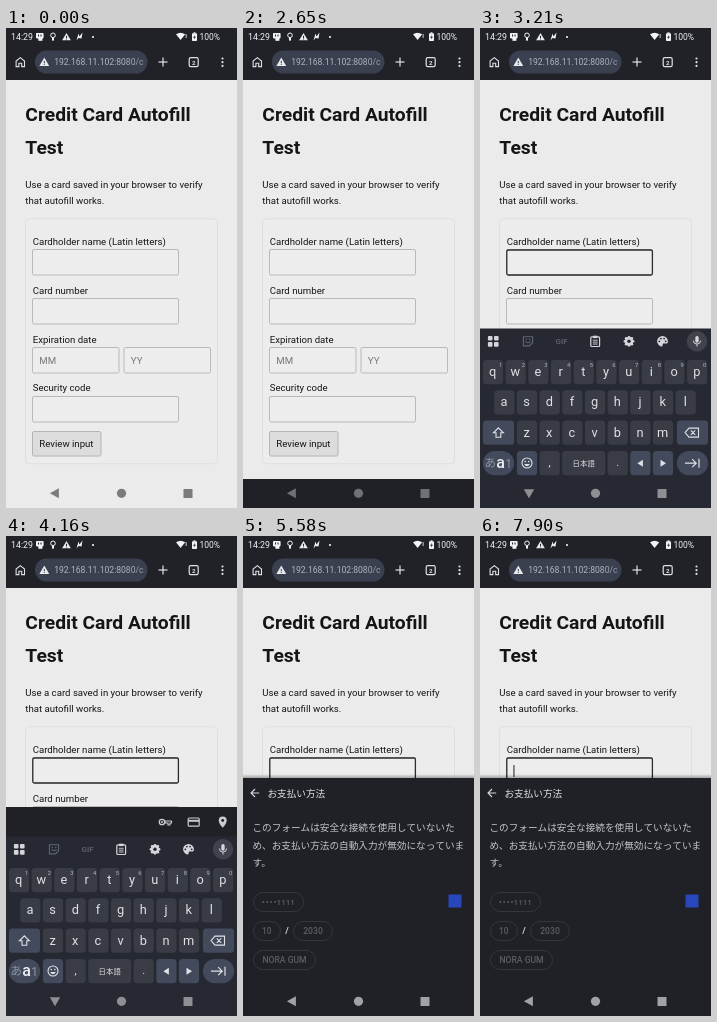
Animation, 231 px wide and 480 px high, one loop 8000 ms. Source, as an HTML page with a canvas:

```html
<!DOCTYPE html>
<html lang="en">
<head>
<meta charset="utf-8">
<title>Card autofill demo</title>
<style>
html, body { margin: 0; width: 100%; height: 100%; overflow: hidden; background: #ebebeb; }
canvas { display: block; width: 100%; height: 100%; }
</style>
</head>
<body>
<canvas id="stage"></canvas>
<script>
const W = 231, H = 480, LOOP = 8000;
const SANS = 'Roboto, "Noto Sans", sans-serif';
const CJK = '"Noto Sans CJK JP", "Noto Sans CJK", sans-serif';
const PAGE = '#ebebeb', DARK = '#202228', BAR = '#1f2127', PILL = '#3b4050';
const BOARD = '#262932', KEY = '#393c45', TINT = '#434a5c', LIGHT = '#dfe1e6';

const canvas = document.getElementById('stage');
const ctx = canvas.getContext('2d');

// Stepped timelines: [start time, value]
const ACCESSORY_TOP = [[0, 451], [2720, 444], [2790, 435], [2860, 427], [2930, 422], [3280, 271]];
const ACCESSORY_ALPHA = [[0, 0], [2790, 0.3], [2860, 0.7], [2930, 1], [3280, 0.6], [3350, 1]];
const KEYBOARD_DROP = [[0, 181], [3070, 130], [3140, 45], [3210, 0], [4360, 10], [4430, 58], [4560, 130], [4630, 168], [4700, 181]];
const CARET = [[0, 0], [2720, 1], [3210, 0], [3690, 1], [4160, 0], [4770, 1], [5380, 0],
  [5880, 1], [6380, 0], [6880, 1], [7380, 0], [7870, 1]];

function at(steps, t) {
  let value = steps[0][1];
  for (const [start, v] of steps) if (t >= start) value = v;
  return value;
}

function rect(x, y, w, h, color) {
  ctx.fillStyle = color;
  ctx.fillRect(x, y, w, h);
}

function box(x, y, w, h, r, fill, stroke, line = 1) {
  ctx.beginPath();
  ctx.roundRect(x, y, w, h, r);
  if (fill) { ctx.fillStyle = fill; ctx.fill(); }
  if (stroke) { ctx.strokeStyle = stroke; ctx.lineWidth = line; ctx.stroke(); }
}

function disc(x, y, r, fill) {
  ctx.beginPath();
  ctx.arc(x, y, r, 0, Math.PI * 2);
  ctx.fillStyle = fill;
  ctx.fill();
}

function ring(x, y, r, color, line = 1) {
  ctx.beginPath();
  ctx.arc(x, y, r, 0, Math.PI * 2);
  ctx.strokeStyle = color;
  ctx.lineWidth = line;
  ctx.stroke();
}

function shape(d, x, y, fill, stroke, line = 1) {
  ctx.save();
  ctx.translate(x, y);
  const path = new Path2D(d);
  if (fill) { ctx.fillStyle = fill; ctx.fill(path); }
  if (stroke) { ctx.strokeStyle = stroke; ctx.lineWidth = line; ctx.stroke(path); }
  ctx.restore();
}

function text(s, x, y, size, color, { weight = 400, align = 'left', font = SANS } = {}) {
  ctx.font = `${weight} ${size}px ${font}`;
  ctx.textAlign = align;
  ctx.fillStyle = color;
  ctx.fillText(s, x, y);
}

function warning(x, y, s, hole) {
  shape(`M0 ${-s} L${s * 1.12} ${s * 0.9} H${-s * 1.12} Z`, x, y, '#e8eaed');
  rect(x - 0.5, y - s * 0.25, 1, s * 0.55, hole);
  rect(x - 0.5, y + s * 0.45, 1, 0.9, hole);
}

function drawTop(t) {
  const white = '#f1f3f4';
  rect(0, 0, W, 52, DARK);
  text('14:29', 5, 12, 8.8, white);
  box(30, 5, 7.6, 5.4, 0.8, white);
  rect(32.4, 10, 4, 2.8, white);
  rect(32, 6.5, 1, 2, DARK);
  rect(34.5, 6.5, 1, 2, DARK);
  ring(47, 7.3, 2.3, white);
  rect(46, 10, 2, 2.6, white);
  warning(60.5, 8.8, 3.9, DARK);
  shape('M-3 4 L-1 -3 L0 0 L3 -4 L2 2 L-1 1.5 Z', 73.5, 8.5, white);
  disc(87, 9, 1.1, white);
  shape('M-4.6 -2 Q0 -5 4.6 -2 L0 3.8 Z', 174.6, 8.3, white);
  if (t < 7170) rect(179.6, 6, 1.1, 4, '#b9bbbf');
  box(186, 5.3, 5, 7.8, 0.8, white);
  rect(187.5, 4.3, 2, 1.2, white);
  shape('M.5 -2.4 L-1.4 .5 H0 L-.4 2.4 L1.5 -.5 H0 Z', 188.5, 9.2, DARK);
  text('100%', 193.5, 12, 8.5, white);

  shape('M0 -4.6 L4.2 -1.2 V4.4 H1.4 V1 H-1.4 V4.4 H-4.2 V-1.2 Z', 14.3, 34.2, null, LIGHT, 1.1);
  box(29, 22.5, 112.5, 23, 11.5, PILL);
  warning(38.3, 34, 4.4, PILL);
  const fade = ctx.createLinearGradient(118, 0, 141, 0);
  fade.addColorStop(0, '#b0b5c0');
  fade.addColorStop(1, '#8d93a0');
  text('192.168.11.102:8080/c', 48.2, 37.3, 8.6, fade);
  rect(152.5, 33.4, 9, 1.2, LIGHT);
  rect(156.4, 29.5, 1.2, 9, LIGHT);
  box(183.2, 29.7, 9, 9, 1.6, null, LIGHT, 1.2);
  text('2', 187.7, 36.5, 6.2, LIGHT, { weight: 700, align: 'center' });
  for (const y of [30.5, 34.2, 37.9]) disc(216.5, y, 1.1, LIGHT);
}

function drawPage(t) {
  const ink = '#151515', size = 9.63;
  rect(0, 52, W, H - 52, PAGE);
  text('Credit Card Autofill', 19.3, 93.4, 19.27, ink, { weight: 700 });
  text('Test', 19.3, 126.2, 19.27, ink, { weight: 700 });
  text('Use a card saved in your browser to verify', 19.3, 159.8, size, ink);
  text('that autofill works.', 19.3, 176.2, size, ink);
  box(19.5, 190.8, 192, 245, 4, '#ececec', '#dfdfdf');

  const labels = ['Cardholder name (Latin letters)', 'Card number', 'Expiration date', 'Security code'];
  labels.forEach((label, i) => {
    const y = 216.9 + i * 48.8, top = Math.round(y + 4.4) + 0.5;
    text(label, 26.7, y, size, ink);
    if (i === 2) {
      ['MM', 'YY'].forEach((hint, j) => {
        const x = 26.5 + j * 91.5;
        box(x, top, 86.5, 25.5, 1.5, '#ededed', '#b9b9b9');
        text(hint, x + 6.8, top + 16.2, size, '#7a7a7a');
      });
    } else {
      box(26.5, top, 146, 25.5, 1.5, '#ededed', '#b9b9b9');
    }
  });
  if (t >= 2720) {
    box(26.8, 222, 145.6, 25, 1.5, null, '#2c2c2c', 1.3);
    if (at(CARET, t)) rect(33.4, 229, 1.1, 12, '#333333');
  }
  box(26.5, 403.5, 68.5, 24.5, 1.5, '#dcdcdc', '#b4b4b4');
  text('Review input', 33.3, 419, size, ink);
}

function drawAccessory(t) {
  const y = at(ACCESSORY_TOP, t), c = '#c9cbd1';
  rect(0, y, W, t < 3280 ? H - y : 30, BAR);
  ctx.globalAlpha = at(ACCESSORY_ALPHA, t);
  const m = y + 15;
  ring(156, m, 2.7, c, 1.3);
  disc(156, m, 1, c);
  shape('M3 -1 H9.5 V1 H8 V3 H6 V1 H3 Z', 156, m, null, c, 1.1);
  box(182.2, m - 4, 11, 8.2, 1, null, c, 1.2);
  rect(182.2, m - 2.2, 11, 2, c);
  shape('M0 5.8 C-2 3 -4 1 -4 -1.6 A4 4 0 0 1 4 -1.6 C4 1 2 3 0 5.8 Z', 216.7, m, c);
  disc(216.7, m - 1.5, 1.4, BAR);
  ctx.globalAlpha = 1;
}

function drawSheet() {
  const body = '#c3c5ca', dim = '#5b5e64', edge = '#34363b';
  const shadow = ctx.createLinearGradient(0, 238, 0, 242);
  shadow.addColorStop(0, 'rgba(0,0,0,0)');
  shadow.addColorStop(1, 'rgba(0,0,0,0.3)');
  rect(0, 238, W, 4, shadow);
  rect(0, 242, W, H - 242, BAR);
  shape('M4.2 0 H-4 M0 -4 L-4 0 L0 4', 12, 257, null, '#d5d7db', 1.1);
  text('お支払い方法', 24.5, 260.6, 9.63, '#dfe1e5', { font: CJK });
  ['このフォームは安全な接続を使用していないた', 'め、お支払い方法の自動入力が無効になっていま', 'す。']
    .forEach((line, i) => text(line, 9.5, 295 + i * 17.5, 9.63, body, { font: CJK }));

  const chip = (x, y, w) => box(x + 0.5, y + 0.5, w - 1, 19, 9.5, null, edge);
  chip(10, 356, 51);
  for (let i = 0; i < 4; i++) disc(20.3 + i * 3.9, 366, 0.9, dim);
  text('1111', 33.6, 369, 8, dim, { weight: 500 });
  chip(10, 385, 28);
  text('10', 23.8, 398, 8.3, dim, { weight: 500, align: 'center' });
  text('/', 44, 398.2, 9.4, '#d0d2d6', { weight: 700, align: 'center' });
  chip(50, 385, 40);
  text('2030', 70, 398, 8.6, dim, { weight: 500, align: 'center' });
  chip(10, 414, 63);
  text('NORA GUM', 41.5, 427, 8.6, dim, { weight: 500, align: 'center' });
  rect(205.5, 358.5, 13, 13, '#2947bd');
}

function drawToolbar(full) {
  const y = 313.3, c = '#d4d6db', dim = '#62656c';
  for (const dx of [-5.3, 0.8]) for (const dy of [-5.3, 0.8]) box(13.2 + dx, y + dy, 4.6, 4.6, 1, c);
  disc(217, y, 10.3, '#40434c');
  box(215.3, y - 5.2, 3.4, 6.6, 1.7, c);
  shape('M-3.6 -.8 A3.6 3.6 0 0 0 3.6 -.8 M0 3 V5.2', 217, y, null, c, 1);
  if (!full) return;
  shape('M-4.6 -4.6 H4.6 V1.4 L1.4 4.6 H-4.6 Z M-2.5 0 Q0 3 2.5 0', 48, y, null, dim, 1.1);
  disc(46.3, y - 1.8, 0.8, dim);
  disc(49.7, y - 1.8, 0.8, dim);
  text('GIF', 81.5, y + 2.9, 8, dim, { weight: 500, align: 'center' });
  box(110.8, y - 4.4, 8.8, 9.6, 1, null, c, 1.2);
  rect(113, y - 5.6, 4.4, 2.4, c);
  for (const dy of [-1.5, 0.4, 2.3]) rect(112.8, y + dy, 4.8, 0.9, c);
  for (let i = 0; i < 8; i++) {
    const a = i * Math.PI / 4;
    disc(149 + Math.cos(a) * 4, y + Math.sin(a) * 4, 1.4, c);
  }
  disc(149, y, 4.2, c);
  disc(149, y, 1.7, BOARD);
  disc(182.5, y, 5.4, c);
  for (let i = 0; i < 4; i++) {
    const a = Math.PI + i * Math.PI / 3;
    disc(182.5 + Math.cos(a) * 3.2, y + Math.sin(a) * 3.2, 0.9, BOARD);
  }
  shape('M0 2.2 H5 L2 6 H-1 Z', 183, y, BOARD);
}

function drawKeyboard(drop, full) {
  const pitch = 22.68, keyW = 20.2, keyH = 24.2;
  const tops = [332, 362.2, 392.5, 423];
  ctx.save();
  ctx.translate(0, drop);
  rect(0, 300.5, W, 181, BOARD);
  drawToolbar(full);

  const key = (cx, row, fill = KEY) => box(cx - keyW / 2, tops[row], keyW, keyH, 3.5, fill);
  ['qwertyuiop', 'asdfghjkl', 'zxcvbnm'].forEach((letters, row) => {
    const first = [13, 24.3, 47][row];
    [...letters].forEach((ch, i) => {
      const x = first + i * pitch;
      key(x, row);
      text(ch, x - 0.4, tops[row] + 16.2, 12.8, LIGHT, { align: 'center' });
      if (row === 0) text((i + 1) % 10, x + 7.6, tops[0] + 7, 5.8, '#b7bac1', { align: 'center' });
    });
  });

  const wide = (x, row, r) => box(x, tops[row], 31.2, keyH, r, TINT);
  wide(2.9, 2, 3.5);
  shape('M0 -5 L5 0 H2.4 V4.5 H-2.4 V0 H-5 Z', 18.4, 404.8, null, LIGHT, 1.1);
  wide(196.9, 2, 3.5);
  shape('M-7 0 L-3 -4.5 H6.5 V4.5 H-3 Z M-1.2 -2.2 L3.2 2.2 M3.2 -2.2 L-1.2 2.2', 212, 404.6, null, LIGHT, 1.1);

  wide(2.9, 3, 12);
  text('あ', 4.6, 439.4, 11.5, '#8d94a5', { font: CJK });
  text('1', 28.6, 439.6, 12, '#8d94a5', { align: 'center' });
  text('a', 20.6, 440, 16, '#eef0f4', { weight: 500, align: 'center' });
  key(47, 3, TINT);
  ring(47, 435, 5, LIGHT, 1.1);
  disc(45.2, 433.6, 0.8, LIGHT);
  disc(48.8, 433.6, 0.8, LIGHT);
  shape('M-2.8 1 A2.9 2.9 0 0 0 2.8 1 Z', 47, 435, LIGHT);
  key(69.7, 3);
  text(',', 69.7, 438, 11, LIGHT, { align: 'center' });
  box(82.2, tops[3], 43, keyH, 3.5, KEY);
  text('日本語', 103.7, 437.9, 7.4, LIGHT, { align: 'center', font: CJK });
  key(137.7, 3);
  text('.', 137.7, 438, 11, LIGHT, { align: 'center' });
  key(160.4, 3, TINT);
  shape('M-3 0 L2.5 -3.5 V3.5 Z', 160.4, 435.2, LIGHT);
  key(183, 3, TINT);
  shape('M3 0 L-2.5 -3.5 V3.5 Z', 183, 435.2, LIGHT);
  wide(196.9, 3, 12);
  shape('M-7 0 H4 M.2 -4 L4.2 0 L.2 4 M7 -4.5 V4.5', 212, 435.2, null, LIGHT, 1.2);
  ctx.restore();
}

function drawNav(t) {
  const color = t < 2650 ? '#7b7b7b' : t < 2720 ? '#6f7175' : t < 4360 ? '#8d8f93' : '#a0a2a6';
  const down = t >= 3140 && t < 4360;
  shape(down ? 'M-5.2 -4 H5.2 L0 5 Z' : 'M4.6 -5 V5 L-4.4 0 Z', down ? 49 : 48.3, 465.3, color);
  disc(115.5, 465.3, 4.6, color);
  box(177.5, 461, 9, 9, 0.6, color);
}

function draw(t) {
  ctx.setTransform(canvas.width / W, 0, 0, canvas.height / H, 0, 0);
  drawPage(t);
  drawTop(t);
  if (t >= 4360) drawSheet();
  else if (t >= 2650) drawAccessory(t);
  const drop = at(KEYBOARD_DROP, t);
  if (drop < 180) drawKeyboard(drop, t < 4360);
  drawNav(t);
}

function resize() {
  const ratio = window.devicePixelRatio || 1;
  canvas.width = Math.round((innerWidth || W) * ratio);
  canvas.height = Math.round((innerHeight || H) * ratio);
}

const start = performance.now();
function frame() {
  draw((performance.now() - start) % LOOP);
  requestAnimationFrame(frame);
}

addEventListener('resize', resize);
resize();
frame();
</script>
</body>
</html>
```
